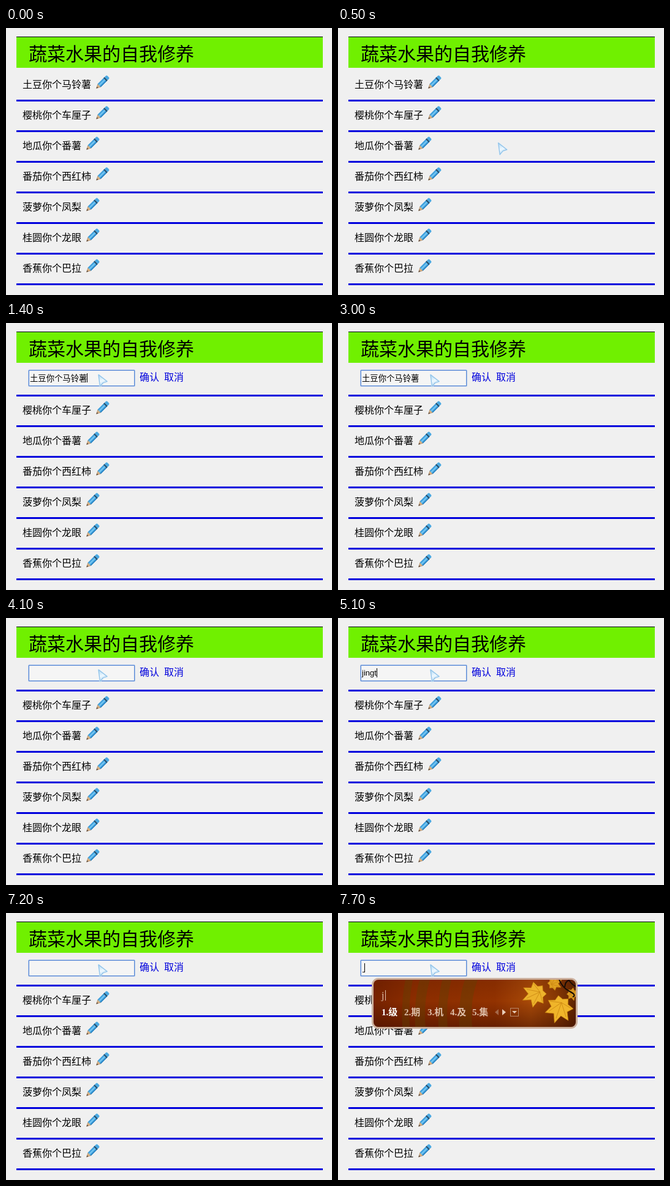
Write an HTML page with a canvas that moves like this. It is 532 px wide and 436 px high and loops after 8000 ms.

```html
<!DOCTYPE html>
<html lang="zh-CN">
<head>
<meta charset="utf-8">
<title>蔬菜水果的自我修养</title>
<style>
html, body { margin: 0; width: 100%; height: 100%; overflow: hidden; background: #f0f0f0; }
canvas { display: block; }
</style>
</head>
<body>
<canvas id="stage" width="532" height="436"></canvas>
<script>
const ctx = document.getElementById('stage').getContext('2d');
const LOOP = 8000;
const CJK = '"Noto Sans CJK SC", "Noto Sans CJK", sans-serif';
const FIELD_FONT = '13.33px ' + CJK;
const LATIN_FONT = '13px "Liberation Sans", ' + CJK;
const BLUE = '#0000dd';
const FIRST = '土豆你个马铃薯';
const WORD = 'jingtong';
const items = [FIRST, '樱桃你个车厘子', '地瓜你个番薯', '番茄你个西红柿',
  '菠萝你个凤梨', '桂圆你个龙眼', '香蕉你个巴拉'];

// Field contents over time: start, text, caret visible
const edits = [
  [1100, FIRST, false], [1400, FIRST, true], [3000, FIRST, false],
  ...[[3400, 6], [3500, 5], [3900, 2], [4000, 0]].map(([t, n]) => [t, FIRST.slice(0, n), true]),
  [4100, '', false],
  ...[[4600, 2], [4800, 3], [4900, 4], [5100, 5], [5500, 6], [5600, 7], [5800, 8], [5900, 7],
    [6200, 6], [6300, 5], [6500, 4], [6600, 3], [6700, 2], [6800, 1], [7000, 0]]
    .map(([t, n]) => [t, WORD.slice(0, n), true]),
  [7200, '', false]
];

function text(str, x, y, font, color) {
  ctx.font = font;
  ctx.fillStyle = color;
  ctx.fillText(str, x, y);
}

function rect(x, y, w, h, color) {
  ctx.fillStyle = color;
  ctx.fillRect(x, y, w, h);
}

function poly(points, fill, stroke, width = 1) {
  ctx.beginPath();
  points.forEach(([x, y]) => ctx.lineTo(x, y));
  ctx.closePath();
  if (fill) { ctx.fillStyle = fill; ctx.fill(); }
  if (stroke) { ctx.strokeStyle = stroke; ctx.lineWidth = width; ctx.stroke(); }
}

function round(x, y, w, h, r) {
  ctx.beginPath();
  ctx.roundRect(x, y, w, h, r);
}

function pencil(x, y) {
  ctx.save();
  ctx.translate(x + 0.5, y + 20.5);
  ctx.rotate(-Math.PI / 4);
  poly([[0, 0], [7, -3.4], [7, 3.4]], '#d9b184', '#9b7a58', 0.6);
  poly([[0, 0], [2.6, -1.3], [2.6, 1.3]], '#4a3c34');
  rect(6.5, -3.6, 14.5, 7.2, '#3f9fdc');
  rect(6.5, -1.4, 14.5, 2.4, '#74c6f2');
  rect(6.5, 2.4, 14.5, 1.2, '#2a7fbd');
  rect(20, -3.6, 2.4, 7.2, '#27506f');
  round(22.2, -3.6, 5, 7.2, [0, 2, 2, 0]);
  ctx.fillStyle = '#4aa9e2';
  ctx.fill();
  ctx.restore();
}

function page(editing) {
  rect(0, 0, 532, 436, '#f0f0f0');
  rect(17, 14, 500, 1, '#000');
  rect(17, 15, 500, 50, '#70f000');
  text('蔬菜水果的自我修养', 37, 53, '30px ' + CJK, '#000');
  items.forEach((name, i) => {
    const y = 50 * i;
    rect(17, y + 117, 500, 3, BLUE);
    if (i === 0 && editing) return;
    text(name, 27, y + 98, '16px ' + CJK, '#000');
    pencil(35 + name.length * 16, y + 78);
  });
}

function field(t) {
  const [, value, caret] = edits.filter(e => e[0] <= t).pop();
  const focused = t >= 1400;
  if (focused) {
    round(36, 76, 175, 28, 2.5);
    ctx.fillStyle = '#a5c0ea';
    ctx.fill();
  }
  rect(37, 77, 173, 26, focused ? '#5c8ad4' : '#a8a8a8');
  rect(38, 78, 171, 24, '#f5f5f5');
  const font = t < 4600 ? FIELD_FONT : LATIN_FONT;
  text(value, 39, t < 4600 ? 94.5 : 94, font, '#000');
  const end = 39 + Math.round(ctx.measureText(value).width - 0.1);
  if (caret) rect(end, 82, 1, value ? 15 : 16, '#000');
  if (t >= 7700) {
    rect(40, 96, 3, 1, '#000');
    rect(43, 82, 1, 15, '#000');
  }
  text('确认', 218, 94, '16px ' + CJK, BLUE);
  text('取消', 258, 94, '16px ' + CJK, BLUE);
}

function leaf(x, y, r, turn, color) {
  const pts = [];
  for (let i = 0; i < 14; i++) {
    const a = turn + i * Math.PI / 7;
    const d = i % 2 ? r * 0.52 : r * (0.85 + 0.15 * Math.cos(a - turn));
    pts.push([x + d * Math.cos(a), y + d * Math.sin(a)]);
  }
  poly(pts, color, '#c88310', 0.8);
  ctx.beginPath();
  for (let i = -4; i <= 4; i += 2) {
    const a = turn + i * Math.PI / 7;
    ctx.moveTo(x - r * 0.3 * Math.cos(turn), y - r * 0.3 * Math.sin(turn));
    ctx.lineTo(x + r * 0.7 * Math.cos(a), y + r * 0.7 * Math.sin(a));
  }
  ctx.stroke();
}

function panel() {
  round(55, 106, 336, 83, 11);
  ctx.fillStyle = '#ccb09e';
  ctx.fill();
  ctx.save();
  round(58, 109, 330, 77, 8);
  ctx.clip();
  const bg = ctx.createLinearGradient(58, 0, 388, 0);
  [[0, '#782300'], [0.2, '#8c2d00'], [0.6, '#923200'], [0.78, '#a84a08'], [0.9, '#8a3a04'], [1, '#5e2402']]
    .forEach(([p, c]) => bg.addColorStop(p, c));
  rect(58, 109, 330, 77, bg);
  const shade = ctx.createLinearGradient(0, 109, 0, 186);
  shade.addColorStop(0, 'rgba(60,10,0,.15)');
  shade.addColorStop(0.45, 'rgba(60,10,0,0)');
  shade.addColorStop(1, 'rgba(50,8,0,.45)');
  rect(58, 109, 330, 77, shade);

  // Soft blades behind the candidates
  [[105, 17], [126, 24], [164, 21], [198, 30]].forEach(([x, w]) => {
    ctx.beginPath();
    ctx.moveTo(x + w * 0.3, 109);
    ctx.lineTo(x + w, 109);
    ctx.quadraticCurveTo(x + w * 0.55, 145, x + w * 0.7, 186);
    ctx.lineTo(x, 186);
    ctx.quadraticCurveTo(x - 2, 140, x + w * 0.3, 109);
    ctx.fillStyle = 'rgba(92,66,4,.38)';
    ctx.fill();
  });

  leaf(323, 132, 24, 2.7, '#edb32c');
  leaf(362, 154, 27, 1.9, '#f0b52a');
  leaf(352, 115, 14, -0.4, '#e0a020');
  leaf(382, 132, 12, 0.4, '#d99a22');
  ctx.strokeStyle = '#160c06';
  ctx.lineWidth = 2;
  ctx.beginPath();
  ctx.moveTo(361, 109);
  ctx.quadraticCurveTo(366, 122, 378, 128);
  ctx.quadraticCurveTo(390, 134, 383, 137);
  ctx.moveTo(370, 121);
  ctx.quadraticCurveTo(371, 111, 377, 110);
  ctx.quadraticCurveTo(383, 118, 388, 120);
  ctx.stroke();
  ctx.restore();

  const pale = '#dfc0ab';
  text('j', 71, 140, '16px "Liberation Serif", serif', pale);
  rect(77, 126, 1, 17, pale);
  const xs = [71, 108, 146, 183, 219];
  ['级', '期', '机', '及', '集'].forEach((c, i) => {
    text(i + 1 + '.' + c, xs[i], 167, 'bold 15px "Liberation Serif", ' + CJK, i ? pale : '#fff');
  });
  poly([[262, 157], [262, 167], [256, 162]], '#a4684a');
  poly([[268, 157], [268, 167], [274, 162]], '#e8cdb9');
  ctx.strokeStyle = '#b88668';
  ctx.lineWidth = 1;
  ctx.strokeRect(281.5, 155.5, 13, 13);
  poly([[284, 160], [292, 160], [288, 164]], '#e8cdb9');
}

function pointer(t) {
  const step = Math.floor(t / 100) * 100;
  const go = Math.min(1, Math.max(0, (step - 200) / 600));
  const ease = 1 - Math.pow(1 - go, 1.6);
  const settle = Math.min(1, Math.max(0, (step - 800) / 200));
  ctx.save();
  ctx.translate(516 - 381 * ease + 15 * settle, 375 - 281 * ease - 10.5 * settle);
  const fill = ctx.createLinearGradient(2, 2, 10, 18);
  fill.addColorStop(0, '#b4dcf6');
  fill.addColorStop(0.55, '#eef8ff');
  fill.addColorStop(1, '#b9dcf4');
  ctx.lineJoin = 'round';
  const arrow = [[1, 1], [15, 12], [8.5, 14], [3.5, 20]];
  poly(arrow, null, '#d9ecfa', 2.4);
  poly(arrow, fill, '#8fc0e6', 1.2);
  ctx.restore();
}

function draw(now) {
  const t = now % LOOP;
  const editing = t >= 1100;
  page(editing);
  if (editing) field(t);
  if (t >= 7700) panel();
  if (t >= 100) pointer(t);
}

const start = performance.now();
function tick() {
  draw(performance.now() - start);
  requestAnimationFrame(tick);
}
tick();
</script>
</body>
</html>
```
